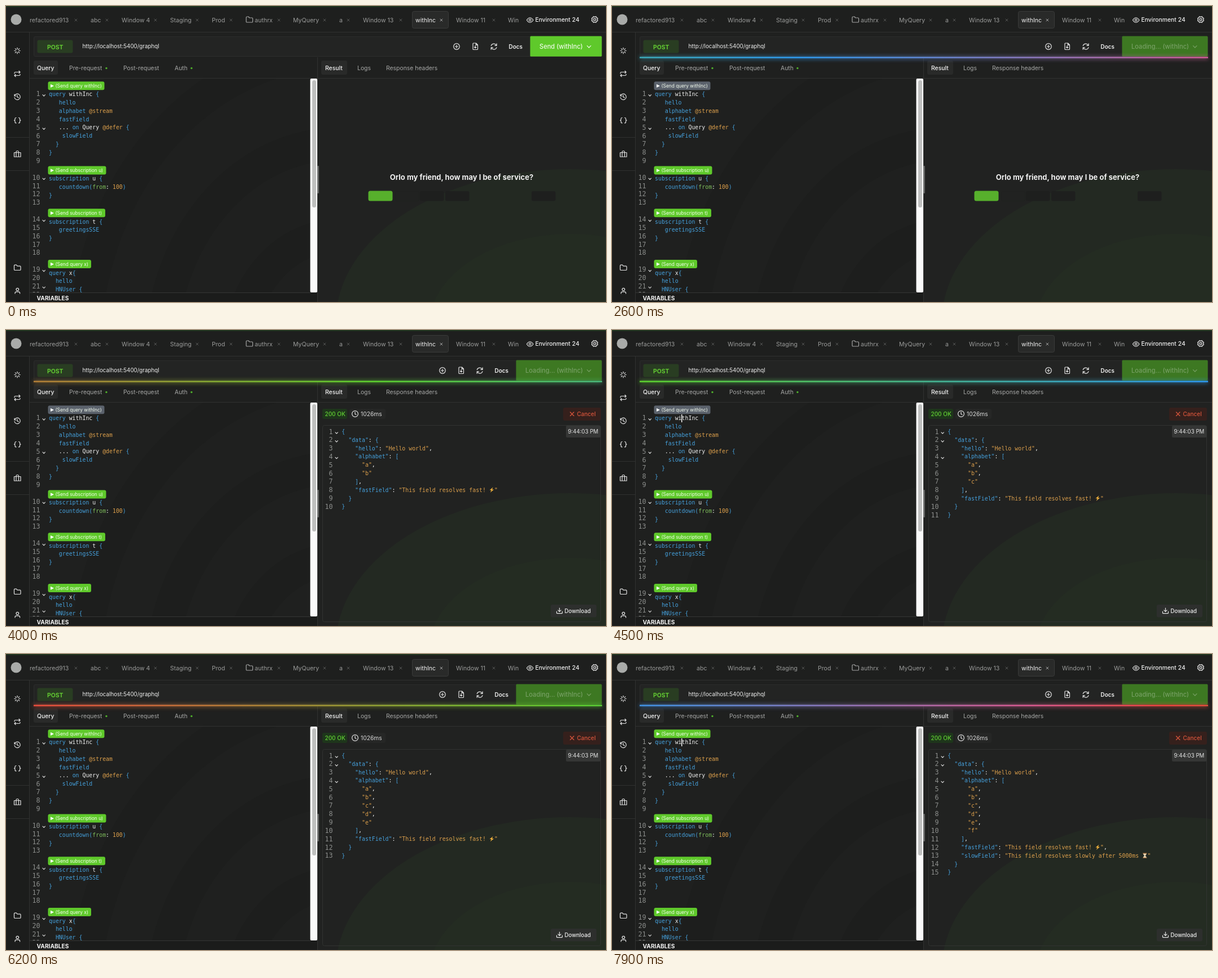
Write an HTML page that moves like this. It is 1064 px wide and 526 px high and loops after 8 s.

```html
<!DOCTYPE html>
<html lang="en">
<head>
<meta charset="utf-8">
<title>GraphQL client</title>
<style>
  html, body { margin: 0; width: 100%; height: 100%; overflow: hidden; background: #1f201f; }
  svg { display: block; width: 1064px; height: 526px; }
  text { font-family: Inter, sans-serif; white-space: pre; }
  .mono { font-family: "DejaVu Sans Mono", monospace; }
</style>
</head>
<body>
<svg id="stage" viewBox="0 0 1064 526" xmlns="http://www.w3.org/2000/svg">
  <defs>
    <linearGradient id="flow" gradientUnits="userSpaceOnUse" x1="49" x2="3073" y1="0" y2="0" spreadMethod="repeat">
      <stop offset="0" stop-color="#5ed32f"/>
      <stop offset=".3333" stop-color="#2f9bf0"/>
      <stop offset=".59" stop-color="#dc5a90"/>
      <stop offset=".6667" stop-color="#f0483e"/>
      <stop offset="1" stop-color="#5ed32f"/>
    </linearGradient>
    <filter id="blur" filterUnits="userSpaceOnUse" x="30" y="70" width="1034" height="45"><feGaussianBlur stdDeviation="3.5"/></filter>
    <clipPath id="query"><rect x="42" y="129" width="498" height="380"/></clipPath>
    <clipPath id="right"><rect x="553" y="129" width="511" height="397"/></clipPath>
  </defs>
</svg>
<script>
const NS = 'http://www.w3.org/2000/svg';
const stage = document.getElementById('stage');
const LOOP = 8000, ROW = 14.82, CHAR = 5.95;
const GREEN = [95, 201, 43], GREY = [91, 98, 108];
const INK = { b: '#45a0dc', w: '#f0f0f0', o: '#dda04c', g: '#7fbf5c' };
const STROKE = {
  fill: 'none', stroke: '#e4e4e4', 'stroke-width': 1.2, 'stroke-linecap': 'round', 'stroke-linejoin': 'round'
};

function el(parent, tag, attrs, content) {
  const node = document.createElementNS(NS, tag);
  for (const key in attrs) node.setAttribute(key, attrs[key]);
  if (content !== undefined) node.textContent = content;
  parent.appendChild(node);
  return node;
}
const group = (parent, attrs) => el(parent, 'g', attrs);
const box = (p, x, y, width, height, fill, rx = 0, more) =>
  el(p, 'rect', { x, y, width, height, fill, rx, ...more });
const line = (p, d, stroke) => el(p, 'path', { d, stroke, fill: 'none' });
const icon = (p, d, more) => el(p, 'path', { d, ...STROKE, ...more });
const ring = (p, cx, cy, r) => el(p, 'circle', { cx, cy, r, ...STROKE });

// y is the middle of the capitals
const label = (p, str, x, y, size, fill, weight = 400, more) =>
  el(p, 'text', { x, y: y + size * 0.36 + 0.4, 'font-size': size, fill, 'font-weight': weight, ...more }, str);

// each part starts with its ink key
function code(p, x, y, ...parts) {
  const row = el(p, 'text', { x, y: y + 3.7, 'font-size': 9.88, class: 'mono' });
  parts.forEach(s => el(row, 'tspan', { fill: INK[s[0]] }, s.slice(1)));
}
const lineNo = (p, n, x, y) =>
  label(p, n, x, y - 0.4, 11.7, '#8b8d8b', 400, { class: 'mono', 'text-anchor': 'end' });
const fold = (p, x, y) => icon(p, `M${x - 2} ${y + 1.5}l2.2 2.4l2.2 -2.4`, { 'stroke-width': 1.1 });

function backdrop() {
  box(stage, 0, 0, 1064, 526, '#1f201f');
  const dark = group(stage, { 'clip-path': 'url(#query)', fill: 'none', stroke: '#1d1e1d' });
  [430, 300, 170].forEach(r =>
    el(dark, 'ellipse', { cx: 590, cy: 620, rx: r * 1.05, ry: r * 1.25, 'stroke-width': 58 }));
  const glow = group(stage, { 'clip-path': 'url(#right)' });
  box(glow, 553, 129, 511, 397, '#212221');
  el(glow, 'ellipse', { cx: 1000, cy: 560, rx: 415, ry: 270, fill: '#232922' });
  el(glow, 'ellipse', { cx: 1000, cy: 570, rx: 250, ry: 165, fill: '#242c22' });
  box(stage, 0, 0, 1064, 2, '#20351f');
  box(stage, 0, 2, 1064, 44, '#1e1f1e');
  box(stage, 0, 46, 41, 480, '#1c1d1c');
  line(stage, 'M0 46.5H1064M41.5 46V526M0 233.5H41M0 292.5H41M42 128.5H1064M552.5 91V526', '#303130');
}

function tabs() {
  el(stage, 'circle', { cx: 18, cy: 24, r: 9.5, fill: '#a9aba9' });
  box(stage, 720.5, 9.5, 64, 30, '#292a29', 3, { stroke: '#3a3b3a' });
  const names = [['refactored913', 42, 124], ['abc', 150, 179], ['Window 4', 205, 265],
    ['Staging', 291, 339], ['Prod', 365, 399], ['authrx', 441, 484], ['MyQuery', 509, 565],
    ['a', 591, 607], ['Window 13', 633, 700], ['withInc', 726, 772], ['Window 11', 798, 865], ['Win', 890, 0]];
  for (const [name, x, close] of names) {
    const on = name === 'withInc';
    label(stage, name, x, 24.3, 10.6, on ? '#f2f2f2' : '#9a9b9a');
    if (close) icon(stage, `M${close - 2} 23l4 4m0 -4l-4 4`, { stroke: on ? '#b0b0b0' : '#5d5e5d', 'stroke-width': 0.9 });
  }
  icon(stage, 'M426 20.5q0 -1.5 1.5 -1.5h2.5l1.7 2h4.5q1.3 0 1.3 1.3v5.4q0 1.3 -1.3 1.3h-8.9q-1.3 0 -1.3 -1.3z', { stroke: '#a5a6a5' });
  icon(stage, 'M923.5 25q5.5 -8.5 11.5 0q-6 8.5 -11.5 0z');
  ring(stage, 929.2, 25, 1.8);
  label(stage, 'Environment 24', 938.5, 24.3, 10.4, '#f0f0f0', 500);
  let gear = '';
  for (let i = 0; i < 24; i++) {
    const r = i % 3 ? 5.6 : 4.2, a = i * Math.PI / 12;
    gear += (i ? 'L' : 'M') + (1044 + r * Math.cos(a)).toFixed(2) + ' ' + (24 + r * Math.sin(a)).toFixed(2);
  }
  icon(stage, gear + 'z');
  ring(stage, 1044, 24, 1.9);
}

function sidebar() {
  for (let i = 0; i < 8; i++)
    icon(stage, 'M0 -2.8V-5.2', { transform: `translate(20 79.5) rotate(${i * 45})` });
  icon(stage, 'M15 120v-1q0 -1.5 1.5 -1.5h8.5m-2 -2l2 2l-2 2M25 121v1q0 1.5 -1.5 1.5h-8.5m2 -2l-2 2l2 2');
  icon(stage, 'M15.2 159.5a5.2 5.2 0 1 1 -.2 3.2M15 157v3h3M20 158.5v3.2l2.2 1.2');
  icon(stage, 'M18 198.5q-2 0 -2 2v1q0 1.7 -1.5 1.7q1.5 0 1.5 1.7v1q0 2 2 2M22.5 198.5q2 0 2 2v1q0 1.7 1.5 1.7q-1.5 0 -1.5 1.7v1q0 2 -2 2');
  icon(stage, 'M14.5 260.5h11.5v7.5h-11.5zM18 268v-8.5q0 -2 2.2 -2t2.2 2v8.5');
  icon(stage, 'M14.5 461.5q0 -1.3 1.3 -1.3h2.7l1.6 2h4.6q1.3 0 1.3 1.3v4.7q0 1.3 -1.3 1.3h-8.9q-1.3 0 -1.3 -1.3z');
  ring(stage, 20.3, 503.6, 2.3);
  icon(stage, 'M16 511v-.8q0 -2.4 2.4 -2.4h3.8q2.4 0 2.4 2.4v.8');
}

function header() {
  box(stage, 49.5, 54.5, 1007, 35, '#232423', 2, { stroke: '#2c2d2c' });
  box(stage, 55.5, 60.5, 63, 23, '#293d22', 3);
  label(stage, 'POST', 73, 72.6, 10.4, '#62c932', 700);
  label(stage, 'http://localhost:5400/graphql', 135.5, 70.8, 9.8, '#eeeeee');
  box(stage, 49, 97, 43, 25, '#292a29', 3);
  box(stage, 559, 97, 46, 25, '#292a29', 3);
  [['Query', 55], ['Pre-request', 112], ['Post-request', 208], ['Auth', 299],
   ['Result', 566], ['Logs', 623], ['Response headers', 674]].forEach(([s, x]) => {
    const on = s === 'Query' || s === 'Result';
    label(stage, s, x, 109.7, 10.4, on ? '#f4f4f4' : '#a6a7a6', on ? 500 : 400);
  });
  [178, 329].forEach(cx => el(stage, 'circle', { cx, cy: 110.5, r: 1.7, fill: '#4fae2c' }));
}

function tools() {
  const g = group(stage);
  ring(g, 799, 72, 5.3);
  icon(g, 'M796.5 72h5M799 69.5v5');
  icon(g, 'M828 67q0 -1 1 -1h4.5l3 3v7.5q0 1 -1 1h-6.5q-1 0 -1 -1zM833.3 66.3v3h3M832.2 70.5v4.3m-1.8 -1.7l1.8 1.8l1.8 -1.8');
  icon(g, 'M860.3 70.6a5 5 0 0 1 9 -1.2l.8 .9m0 -3.4v3.4h-3.3M870 73.6a5 5 0 0 1 -9 1.2l-.8 -.9m0 3.4v-3.4h3.3');
  label(g, 'Docs', 891.5, 72, 9.9, '#f4f4f4', 600);
  return g;
}

function sendButton(text, x, fill, ink) {
  const g = group(stage);
  box(g, x - 0.5, 53.5, 1057 - x, 36.2, fill, 1.5);
  label(g, text, x + 16, 72, 11.1, ink, 500);
  icon(g, 'M1030.5 70.7l3.3 3.3l3.3 -3.3', { stroke: ink });
  return g;
}

function runButton(text, y, width) {
  const rect = box(stage, 74.5, y - 7.5, width, 15, `rgb(${GREEN})`, 3);
  el(stage, 'path', { d: `M79 ${y - 2.7}l6 3l-6 3z`, fill: '#fff' });
  label(stage, text, 87.5, y - 0.4, 8.35, '#f6fff0');
  return rect;
}

function editor() {
  const g = group(stage, { 'clip-path': 'url(#query)' });
  const skips = n => (n > 9) + (n > 13) + (n > 18);
  for (let n = 1; n <= 22; n++) {
    const y = 156.2 + ROW * (n - 1) + 15 * skips(n);
    lineNo(g, n, 60.5, y);
    if ([1, 5, 10, 14, 19, 21].includes(n)) fold(g, 67, y);
  }
  const rows = [
    [1, 0, 'bquery ', 'wwithInc ', 'b{'], [2, 3, 'bhello'], [3, 3, 'balphabet ', 'o@stream'], [4, 3, 'bfastField'],
    [5, 3, 'w... ', 'bon ', 'wQuery ', 'o@defer ', 'b{'], [6, 4, 'bslowField'], [7, 2, 'b}'], [8, 0, 'b}'],
    [10, 0, 'bsubscription ', 'wu ', 'b{'], [11, 3, 'bcountdown(', 'gfrom', 'w: ', 'o100', 'b)'], [12, 0, 'b}'],
    [14, 0, 'bsubscription ', 'wt ', 'b{'], [15, 3, 'bgreetingsSSE'], [16, 0, 'b}'],
    [19, 0, 'bquery ', 'wx', 'b{'], [20, 2, 'bhello'], [21, 2, 'bHNUser {']];
  for (const [n, indent, ...parts] of rows)
    code(g, 76 + indent * CHAR, 156.5 + ROW * (n - 1) + 16.9 * skips(n), ...parts);
  const first = runButton('(Send query withInc)', 141.7, 100);
  runButton('(Send subscription u)', 292, 103);
  runButton('(Send subscription t)', 367.7, 101.5);
  runButton('(Send query x)', 458.5, 76.5);
  box(stage, 539.5, 129, 12.5, 380, '#fafafa', 2);
  box(stage, 543, 132, 7, 226, '#bfc0bf', 3.5);
  box(stage, 552, 284, 3, 49, '#666766', 1);
  box(stage, 42, 509, 510, 17, '#1b1c1b');
  line(stage, 'M42 509.5H540', '#343534');
  label(stage, 'VARIABLES', 54.5, 518.7, 10.2, '#f4f4f4', 700);
  return first;
}

function emptyPanel() {
  const g = group(stage);
  label(g, 'Orlo my friend, how may I be of service?', 808, 304.3, 13, '#f2f2f2', 700, { 'text-anchor': 'middle' });
  box(g, 642.5, 328.5, 43, 18, '#57b02c', 3.5);
  box(g, 690.5, 329.5, 42, 17, 'none', 3, { stroke: '#1f211f' });
  [734, 779, 932].forEach(x => box(g, x, 329, 42.5, 17.5, '#1e1f1e', 3));
  return g;
}

function resultPanel() {
  const g = group(stage);
  box(g, 561, 140, 44, 18, '#1e361b', 3);
  label(g, '200 OK', 565.5, 149.2, 10, '#62d133', 500);
  box(g, 609, 140, 64, 18, '#262726', 3);
  ring(g, 619, 149, 5.4);
  icon(g, 'M619 145.8v3.4l2 1.2');
  label(g, '1026ms', 629, 149.2, 10.3, '#d8d8d8');
  box(g, 988, 138, 67, 23, '#35201c', 3);
  icon(g, 'M1000.5 146l6.5 6.5m0 -6.5l-6.5 6.5', { stroke: '#e0573d' });
  label(g, 'Cancel', 1012.5, 149.4, 10, '#d9553c', 500);
  box(g, 561.5, 169.5, 493, 349, 'none', 3, { stroke: '#313331' });
  box(g, 993, 170, 61.5, 21, '#353635', 2);
  label(g, '9:44:03 PM', 996.5, 180.3, 9.7, '#e4e4e4');
  box(g, 966, 488, 81, 22.5, '#2d2f2d', 3);
  icon(g, 'M976.5 500v2.7q0 1 1 1h8q1 0 1 -1v-2.7M981.5 494v6.4m-2.6 -2.5l2.6 2.6l2.6 -2.6');
  label(g, 'Download', 990.5, 499.2, 9.7, '#f0f0f0', 500);
  return g;
}

function bolt(p, x, y) {
  el(p, 'path', { d: `M${x + 6.5} ${y - 4.5}l-6 5h3.2l-2 4.3l6.4 -5.4h-3.3z`, fill: '#f3b33d' });
}
function hourglass(p, x, y) {
  el(p, 'path', { d: `M${x + 1.5} ${y - 4}h6q0 2.5 -2.3 4q2.3 1.5 2.3 4h-6q0 -2.5 2.3 -4q-2.3 -1.5 -2.3 -4z`, fill: '#e6d3b0' });
  line(p, `M${x + 0.8} ${y - 4}h7.4m0 8h-7.4`, '#b8743c');
}

function response(panel, count, slow) {
  const g = group(panel);
  let n = 0;
  const add = (indent, ...parts) => {
    const y = 180.3 + ROW * n++;
    lineNo(g, n, 579.5, y);
    code(g, 595.3 + indent * CHAR, y, ...parts);
    return y;
  };
  const field = (key, value, mark, end) => {
    const y = add(4, `b"${key}"`, 'w: ', `o"${value} `);
    const x = 619.1 + (key.length + value.length + 6) * CHAR;
    mark(g, x, y);
    code(g, x + 9, y, 'o"', 'w' + end);
  };
  fold(g, 586, add(0, 'b{'));
  fold(g, 586, add(2, 'b"data"', 'w: ', 'b{'));
  add(4, 'b"hello"', 'w: ', 'o"Hello world"', 'w,');
  fold(g, 586, add(4, 'b"alphabet"', 'w: ', 'b['));
  for (let i = 0; i < count; i++) add(6, `o"${'abcdef'[i]}"`, i < count - 1 ? 'w,' : 'w');
  add(4, 'b]', 'w,');
  field('fastField', 'This field resolves fast!', bolt, slow ? ',' : '');
  if (slow) field('slowField', 'This field resolves slowly after 5000ms', hourglass, '');
  add(2, 'b}');
  add(0, 'b}');
  return g;
}

backdrop();
tabs();
sidebar();
header();
const toolbar = tools();
const send = sendButton('Send (withInc)', 930, '#5fc92b', '#effbe8');
const loading = sendButton('Loading... (withInc)', 905, '#3d7822', '#769f63');
const runFirst = editor();
const caret = box(stage, 123, 150, 1.4, 14, '#fff');
const empty = emptyPanel();
const result = resultPanel();
const answers = [[3200, 2], [4200, 3], [5200, 4], [6200, 5], [7200, 6, true]]
  .map(([at, count, slow]) => ({ at, node: response(result, count, slow) }));
const bar = group(stage);
box(bar, 49, 89.5, 1008, 5, 'url(#flow)', 0, { filter: 'url(#blur)', opacity: 0.6 });
box(bar, 49, 90.3, 1008, 2.5, 'url(#flow)');
const flow = document.getElementById('flow');

const show = (node, on) => node.setAttribute('display', on ? 'inline' : 'none');
const ramp = (t, from, to) => Math.min(1, Math.max(0, (t - from) / (to - from)));

function draw(t) {
  const busy = t >= 2100, ready = t >= 3200;
  const press = ramp(t, 500, 900) - ramp(t, 4900, 5300);
  runFirst.setAttribute('fill', `rgb(${GREEN.map((c, i) => Math.round(c + (GREY[i] - c) * press))})`);
  show(caret, t >= 1800 && (t - 1800) % 1200 < 600);
  show(send, !busy);
  show(loading, busy);
  show(bar, busy);
  toolbar.setAttribute('transform', `translate(${busy ? -25 : 0} 0)`);
  flow.setAttribute('gradientTransform', `translate(${-3024 * ((t - 2000) / 2500 % 1)} 0)`);
  show(empty, !ready);
  show(result, ready);
  answers.forEach(({ at, node }, i) => show(node, t >= at && (i === 4 || t < answers[i + 1].at)));
}

const start = performance.now();
function tick() {
  const t = (performance.now() - start) % LOOP;
  draw(Math.floor(t / 100) * 100);
  requestAnimationFrame(tick);
}
tick();
</script>
</body>
</html>
```
